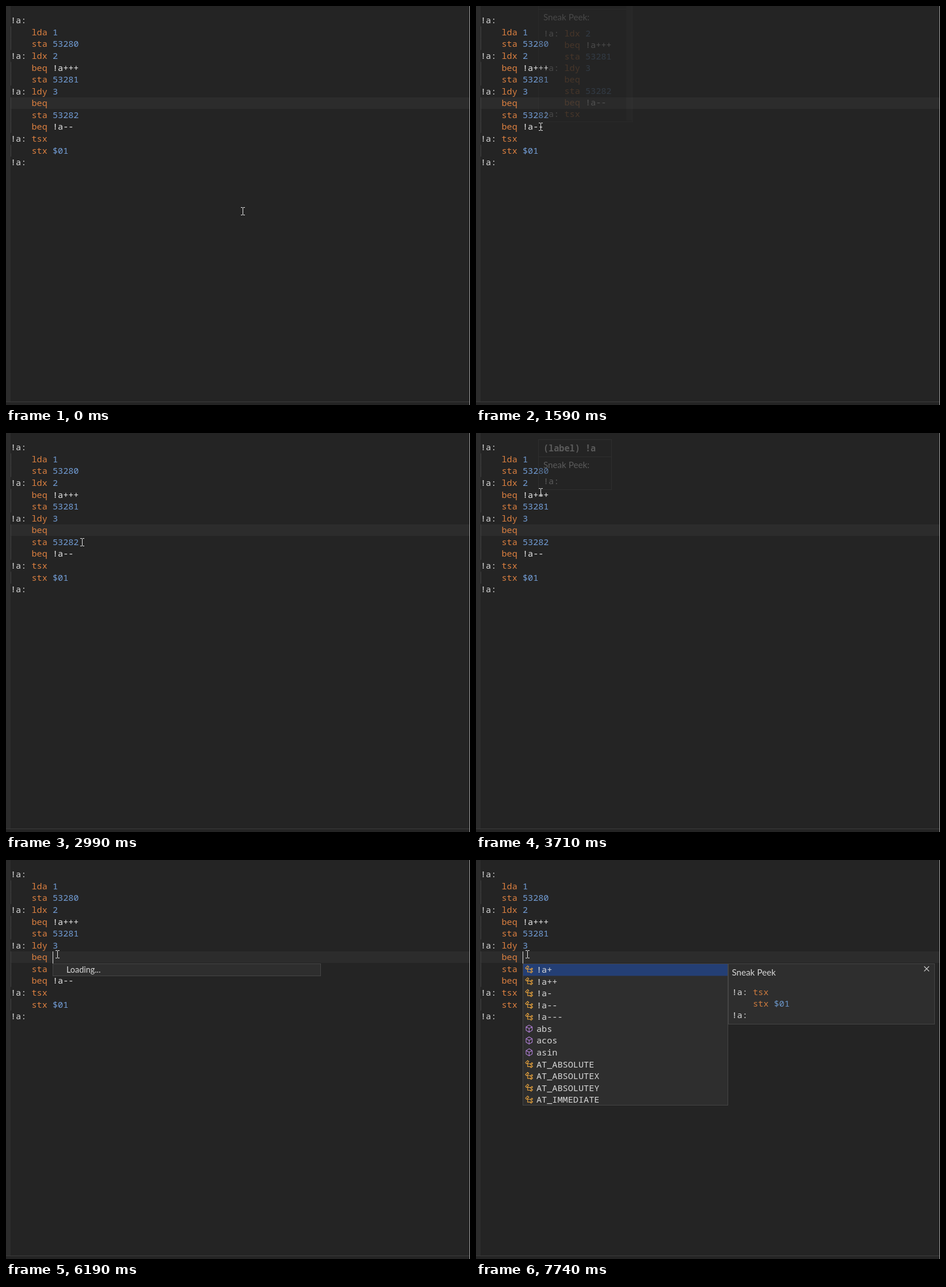
Write an HTML page that moves like this. It is 806x694 px and loops after 8 s.

```html
<!DOCTYPE html>
<html lang="en">
<head>
<meta charset="utf-8">
<title>Assembler label completion</title>
<style>
html, body { margin: 0; width: 100%; height: 100%; overflow: hidden; background: #242424; }
svg { display: block; }
text { white-space: pre; fill: #d8d8d8; font: 500 15.2px "Noto Sans Mono", "DejaVu Sans Mono", monospace; }
.ui { font: 15.2px Lato, "Open Sans", sans-serif; }
.op { fill: #dd8040; }
.num { fill: #729dd6; }
.ref { fill: #e6e6e6; }
.box { fill: #2e2e2e; stroke: #454545; }
.hover .box { fill: #242424; }
.popup .op { fill: #cc7a3e; }
.popup .num { fill: #6b96c9; }
</style>
</head>
<body>
<svg id="stage" width="806" height="694" viewBox="0 0 806 694"></svg>
<script>
const stage = document.getElementById('stage');
const PITCH = 20.58;

function add(parent, tag, attrs = {}, content) {
  const el = document.createElementNS('http://www.w3.org/2000/svg', tag);
  for (const key in attrs) el.setAttribute(key, attrs[key]);
  if (content !== undefined) el.textContent = content;
  parent.append(el);
  return el;
}
const rect = (g, x, y, width, height, fill) => add(g, 'rect', { x, y, width, height, fill });
const box = (g, x, y, x2, y2) =>
  add(g, 'rect', { x: x + .5, y: y + .5, width: x2 - x - 1, height: y2 - y - 1, class: 'box' });
const label = (g, x, y, str, cls = '') => add(g, 'text', { x, y: Math.round(y), class: cls }, str);
const group = (cls = 'popup') => add(stage, 'g', { class: cls });

// Writes source lines with syntax colours.
function code(g, x, y, pitch, lines) {
  lines.forEach((line, i) => {
    const el = label(g, x, y + i * pitch, '');
    for (const part of line.match(/\s+|\S+/g)) {
      const cls = /^[a-z]{3}$/.test(part) ? 'op' : /^\$?\d/.test(part) ? 'num'
        : /^!a[+-]/.test(part) ? 'ref' : '';
      add(el, 'tspan', { class: cls }, part);
    }
  });
}

const lines = ['!a:', '    lda 1', '    sta 53280', '!a: ldx 2', '    beq !a+++', '    sta 53281',
  '!a: ldy 3', '    beq', '    sta 53282', '    beq !a--', '!a: tsx', '    stx $01', '!a:'];

// Editor
const editor = group('');
rect(editor, 0, 0, 8, 688, '#2c2c2c');
rect(editor, 8, 159, 797, 20, '#2c2c2c');
lines.forEach((line, i) => {
  if (line[0] === ' ') rect(editor, 8, 14.9 + i * PITCH, 1, PITCH, '#404040');
});
rect(editor, 805, 0, 1, 694, '#a0a0a0');
rect(editor, 0, 688, 805, 1, '#3b3b3b');
code(editor, 8, 30.2, PITCH, lines);
const caret = rect(editor, 81, 159, 1, 21, '#dddddd');

// Hover with a scrolled code preview
const preview = group('popup hover');
box(preview, 108, -5, 272, 202);
rect(preview, 109, 5, 162, 1, '#454545');
label(preview, 117, 25, 'Sneak Peek:', 'ui');
code(preview, 117, 53, 20, lines.slice(3, 11));
rect(preview, 261, 0, 10, 199, '#363636');

// Hover for a single label
const hint = group('popup hover');
box(hint, 108, 11, 236, 99);
rect(hint, 109, 41, 126, 1, '#454545');
label(hint, 117, 32, '(label) !a').style.fontWeight = 700;
label(hint, 117, 61, 'Sneak Peek:', 'ui');
code(hint, 117, 89, 20, ['!a:']);

// Completion: waiting box, list and details
const loading = group();
box(loading, 81, 180, 547, 202);
label(loading, 105, 196, 'Loading...', 'ui').style.fontSize = '14.4px';

const list = group();
const ICONS = {
  tree: ['#e8a33d', 'M1.4 5.4l4-4 2 2-4 4zM5.3 5.8v6.6h5.2M5.3 7.3h5.2' +
    'M10.3 8l2.7-2.6 1.4 1.3-2.7 2.6zM10.3 13l2.7-2.6 1.4 1.3-2.7 2.6z'],
  cube: ['#b180d7', 'M8 1.5l5.5 3.3v6.2l-5.5 3.4-5.5-3.4v-6.2zM2.5 4.8l5.5 3 5.5-3M8 7.8v6.6']
};
box(list, 81, 180, 438, 427);
rect(list, 82, 181, 355, 20.5, '#243f75');
['!a+', '!a++', '!a-', '!a--', '!a---', 'abs', 'acos', 'asin',
  'AT_ABSOLUTE', 'AT_ABSOLUTEX', 'AT_ABSOLUTEY', 'AT_IMMEDIATE'].forEach((item, i) => {
  const y = 190.6 + i * PITCH;
  const [stroke, d] = ICONS[/^a/.test(item) ? 'cube' : 'tree'];
  add(list, 'path', { d, stroke, fill: 'none', 'stroke-width': 1.15,
    transform: `translate(84.6 ${y - 7.8}) scale(.96)` });
  label(list, 105, y + 5.4, item);
});
const slider = rect(list, 426, 181, 11, 20, 'rgba(121,121,121,.4)');

const details = group();
box(details, 438, 180, 797, 286);
label(details, 444.5, 201, 'Sneak Peek', 'ui');
add(details, 'path', { d: 'M778.5 185l8.5 8.5m0-8.5l-8.5 8.5', stroke: '#cccccc', 'stroke-width': 1.1 });
code(details, 444.5, 235, 20, lines.slice(10));

// Text pointer
const pointer = add(stage, 'path', { d: 'M-3-6.5h3m1 0h3M-3 6.5h3m1 0h3M.5-6v12',
  stroke: '#e6e6e6', fill: 'none' });

// Each move: start, end, number of steps, then the points passed
const moves = [
  [430, 990, 11, [411, 357], [124, 210]],
  [1170, 1320, 4, [124, 210], [112, 210]],
  [2360, 2460, 3, [112, 210], [125, 212]],
  [2820, 3340, 10, [125, 212], [141, 160], [112, 103]],
  [4150, 4300, 4, [112, 103], [129, 128]],
  [4350, 4650, 6, [129, 128], [90, 162]],
  [5080, 5080, 1, [90, 162], [89, 164]]
];

function pointerAt(t) {
  const move = moves.filter(m => m[0] <= t).pop();
  if (!move) return moves[0][3];
  const [start, end, steps, ...pts] = move;
  const gap = (end - start) / (steps - 1) || 1;
  const p = Math.min(1, (Math.floor((t - start) / gap + 1e-6) + 1) / steps);
  const s = p * p * (3 - 2 * p) * (pts.length - 1);
  const i = Math.min(Math.floor(s), pts.length - 2);
  return pts[i].map((v, k) => Math.round(v + (pts[i + 1][k] - v) * (s - i)));
}

const within = (t, a, b) => t >= a && t < b;
const show = (el, opacity) => {
  el.style.opacity = +opacity;
  el.style.display = opacity ? '' : 'none';
};
const fade = (t, a, b, end, first, second) =>
  !within(t, a, end) ? 0 : t < a + (b - a) * .55 ? first : t < b ? second : 1;

function draw(t) {
  const [x, y] = pointerAt(t);
  pointer.setAttribute('transform', `translate(${x} ${y})`);
  show(preview, fade(t, 1590, 1700, 2510, .2, .75));
  show(hint, fade(t, 3710, 3820, 4250, .3, .75));
  show(loading, within(t, 6190, 6250));
  show(list, t >= 6250);
  show(details, t >= 6310);
  show(slider, t < 7100);
  show(caret, within(t, 4800, 5330) || within(t, 5810, 6310) || within(t, 6800, 7310) || t >= 7740);
}

const began = performance.now();
function tick() {
  draw((performance.now() - began) % 8000);
  requestAnimationFrame(tick);
}
tick();
</script>
</body>
</html>
```
